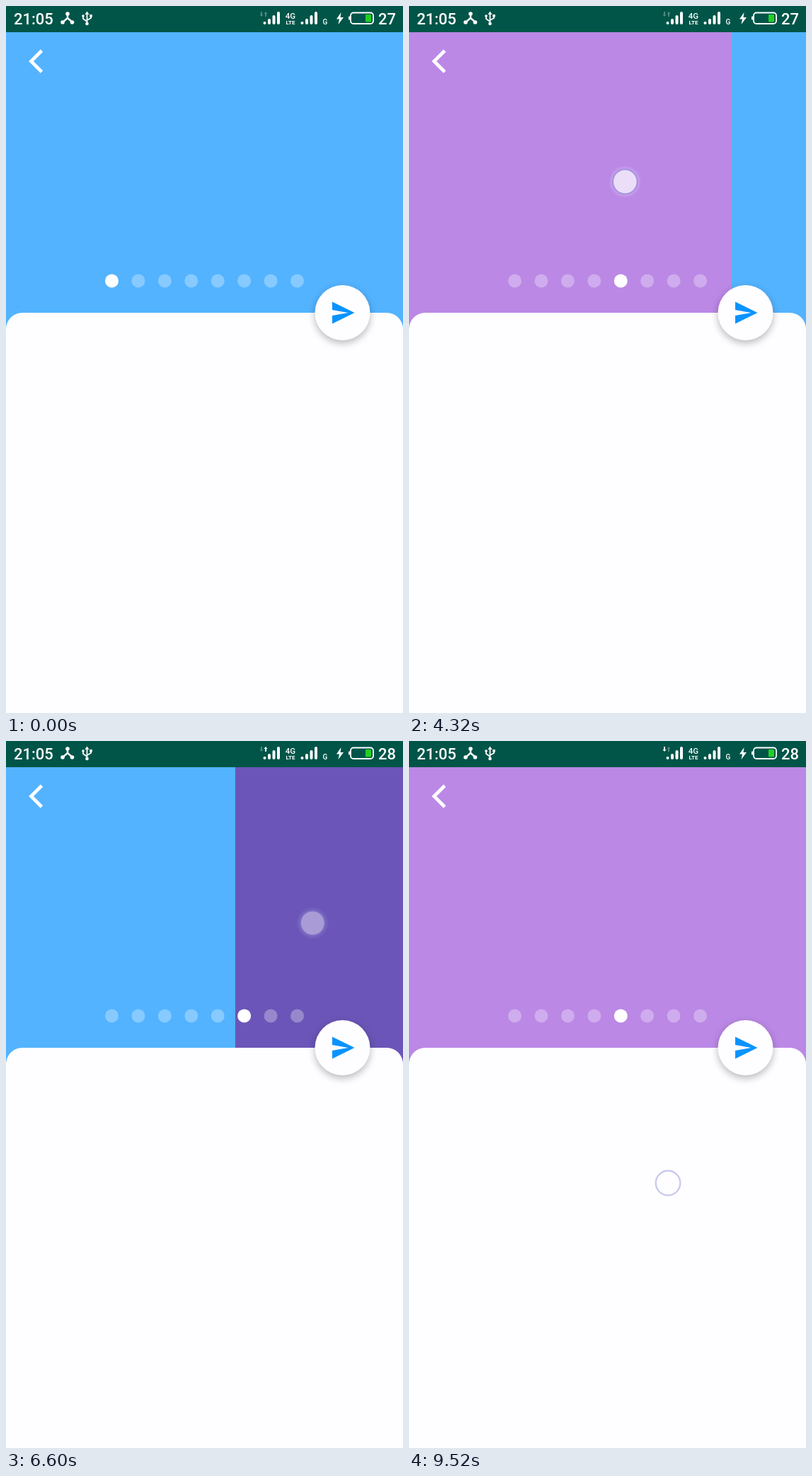
Write an HTML page with a canvas that moves like this. It is 561 px wide and 998 px high and loops after 9.56 s.

```html
<!DOCTYPE html>
<html lang="en">
<head>
<meta charset="utf-8">
<title>Pager and sheet</title>
<style>
  html, body { margin: 0; width: 100%; height: 100%; overflow: hidden; }
  canvas { display: block; }
</style>
</head>
<body>
<canvas id="stage" width="561" height="998"></canvas>
<script>
const W = 561, H = 998, LOOP = 9560, STEP = 40;
const BAR = 37, SHEET_TOP = 433, SHEET_TRAVEL = 312;
const c = document.getElementById('stage').getContext('2d');
const pageColors = ['#53b3ff', '#6b55b8', '#6e70bb', '#5a2dfb', '#bb88e6'];

// axis x turns pages, axis y moves the sheet; dir is the change in page or sheet state
const gesture = (start, dir, x, y, axis = 'x', length = 520) => ({ start, dir, x, y, axis, length });
const gestures = [
  gesture(1720, 1, 390, 247),
  gesture(2400, 1, 390, 247),
  gesture(3077, 1, 370, 247),
  gesture(3645, 1, 390, 247),
  gesture(4213, 1, 410, 248),
  gesture(4690, 1, 400, 248),
  gesture(5520, 1, 390, 250),
  gesture(5950, -1, 290, 255),
  gesture(6373, -1, 293, 257),
  gesture(6790, -1, 290, 257),
  gesture(7400, 1, 366, 674, 'y', 600),
  gesture(8400, -1, 366, 440, 'y', 400)
];
// network activity for each second: 0 idle, 1 down, 2 up
const activity = [1, 0, 2, 1, 0, 0, 2, 0, 0, 1];

// dragged for the first quarter, then decelerating to rest
function flick(u) {
  if (u <= 0) return 0;
  if (u >= 1) return 1;
  return u < .25 ? 2 * u ** 1.5 : 1 - (1 - u) ** 2 / .75;
}

const travelled = (axis, t) => gestures
  .filter(g => g.axis === axis)
  .reduce((sum, g) => sum + g.dir * flick((t - g.start) / g.length), 0);

function rect(x, y, w, h, fill, radius = 0) {
  c.fillStyle = fill;
  c.beginPath();
  c.roundRect(x, y, w, h, radius);
  c.fill();
}

function disc(x, y, r, fill) {
  c.fillStyle = fill;
  c.beginPath();
  c.arc(x, y, r, 0, 7);
  c.fill();
}

function line(path, width, color = '#fff') {
  c.strokeStyle = color;
  c.lineWidth = width;
  c.stroke(new Path2D(path));
}

function shape(path, fill = '#fff') {
  c.fillStyle = fill;
  c.fill(new Path2D(path));
}

function text(value, x, y, size, weight = 400, align = 'left') {
  c.font = `${weight} ${size}px Roboto, sans-serif`;
  c.textAlign = align;
  c.fillStyle = '#fff';
  c.fillText(value, x, y);
}

function withAlpha(alpha, draw) {
  c.save();
  c.globalAlpha *= alpha;
  draw();
  c.restore();
}

function signal(x) {
  [4, 8, 13, 18].forEach((h, i) => rect(x + i * 6.5, 26 - h, 4, h, '#fff', 2));
}

function statusBar(t) {
  rect(0, 0, W, BAR, '#005548');
  text('21:05', 11, 25.5, 22, 500);

  line('M87 11V17L80 23M87 17L94 23', 2.4);
  for (const [x, y] of [[87, 11], [80, 23], [93.5, 23]]) disc(x, y, 2.8, '#fff');

  line('M114.5 10V25M109 14V18L114.5 22M120 14V17L114.5 20', 1.8);
  shape('M111.5 12L114.5 7.5L117.5 12Z');
  disc(114.5, 25, 2.3, '#fff');
  disc(109, 14, 1.8, '#fff');
  rect(118.2, 12, 3.6, 3.6, '#fff');

  const net = activity[Math.floor((t - 40) / 1000)] || 0;
  withAlpha(net === 1 ? 1 : .3, () => shape('M360 8h2v4h1.5L361 15L358.5 12H360Z'));
  withAlpha(net === 2 ? 1 : .3, () => shape('M366 15h2V11h1.5L367 8L364.5 11H366Z'));
  signal(363.5);
  text('4G', 402, 18, 11.5, 500, 'center');
  text('LTE', 402, 26, 8, 700, 'center');
  signal(416.5);
  text('G', 451, 26, 10, 500, 'center');

  shape('M473.5 9L467 18.5H471L469.5 26L477 16H472.5Z');
  rect(484, 14.5, 2.5, 5, '#fff', 1);
  c.strokeStyle = '#fff';
  c.lineWidth = 1.8;
  c.beginPath();
  c.roundRect(487, 9.5, 32, 15.5, 4);
  c.stroke();
  rect(508, 12, 8, 10.5, '#22d022', 1);
  text(t < 6040 ? '27' : '28', 526, 25.5, 22, 500);
}

function pager(position, sheet) {
  const first = Math.floor(position);
  for (const page of [first, first + 1]) {
    const x = Math.round((page - position) * W);
    rect(x, BAR, W, 430, pageColors[page % pageColors.length]);
  }
  withAlpha(sheet, () => rect(0, BAR, W, 430, '#0a95ff'));
  withAlpha(1 - sheet, () => {
    for (let i = 0; i < 8; i++) {
      const fill = i === Math.round(position) ? '#fff' : 'rgba(255,255,255,.3)';
      disc(149.5 + i * 37.43, 388 - SHEET_TRAVEL * sheet, 9.5, fill);
    }
  });
  line('M50.5 63L35.5 78L50.5 93', 4.8);
  withAlpha(sheet, () => text('Title', 280.5, 89, 28, 400, 'center'));
}

function sendButton(y) {
  c.save();
  c.translate(475.5, y);
  c.shadowColor = 'rgba(0,0,0,.28)';
  c.shadowBlur = 11;
  c.shadowOffsetY = 4;
  disc(0, 0, 39, '#fefdff');
  c.shadowColor = 'transparent';
  shape('M-14.5 -15.5L17 0L-14.5 15.5V4L8 0L-14.5 -4Z', '#0a93ff');
  c.restore();
}

function touchRing(x, y, alpha) {
  withAlpha(alpha, () => {
    c.strokeStyle = 'rgba(110,120,205,.4)';
    c.lineWidth = 2.2;
    c.beginPath();
    c.arc(x, y, 17.3, 0, 7);
    c.stroke();
  });
}

function touch(g, t) {
  const age = t - g.start, release = g.length / 4;
  if (age < 0 || age > release + 200) return;
  const moved = g.dir * flick(Math.min(age, release) / g.length);
  const x = g.x - (g.axis === 'x' ? moved * W : 0);
  const y = g.y - (g.axis === 'y' ? moved * SHEET_TRAVEL : 0);
  const alpha = Math.min(1, 1 - (age - release) / 200);
  withAlpha(alpha, () => {
    const halo = c.createRadialGradient(x, y, 16, x, y, 23);
    halo.addColorStop(0, 'rgba(255,255,255,.3)');
    halo.addColorStop(1, 'rgba(255,255,255,0)');
    disc(x, y, 23, halo);
    disc(x, y, 16.5, 'rgba(255,255,255,.6)');
    touchRing(x, y, 1);
  });
}

function draw(t) {
  const position = travelled('x', t);
  const sheet = travelled('y', t);
  const top = SHEET_TOP - SHEET_TRAVEL * sheet;
  pager(position, sheet);
  rect(0, top, W, H, '#fefdff', 23 * (1 - sheet));
  sendButton(SHEET_TOP + 477.5 * sheet);
  statusBar(t);
  gestures.forEach(g => touch(g, t));
  if (t >= 9480) touchRing(366, 624, t < 9520 ? .5 : 1);
}

function frame() {
  const t = performance.now() % LOOP;
  draw(Math.floor(t / STEP) * STEP);
  requestAnimationFrame(frame);
}
frame();
</script>
</body>
</html>
```
